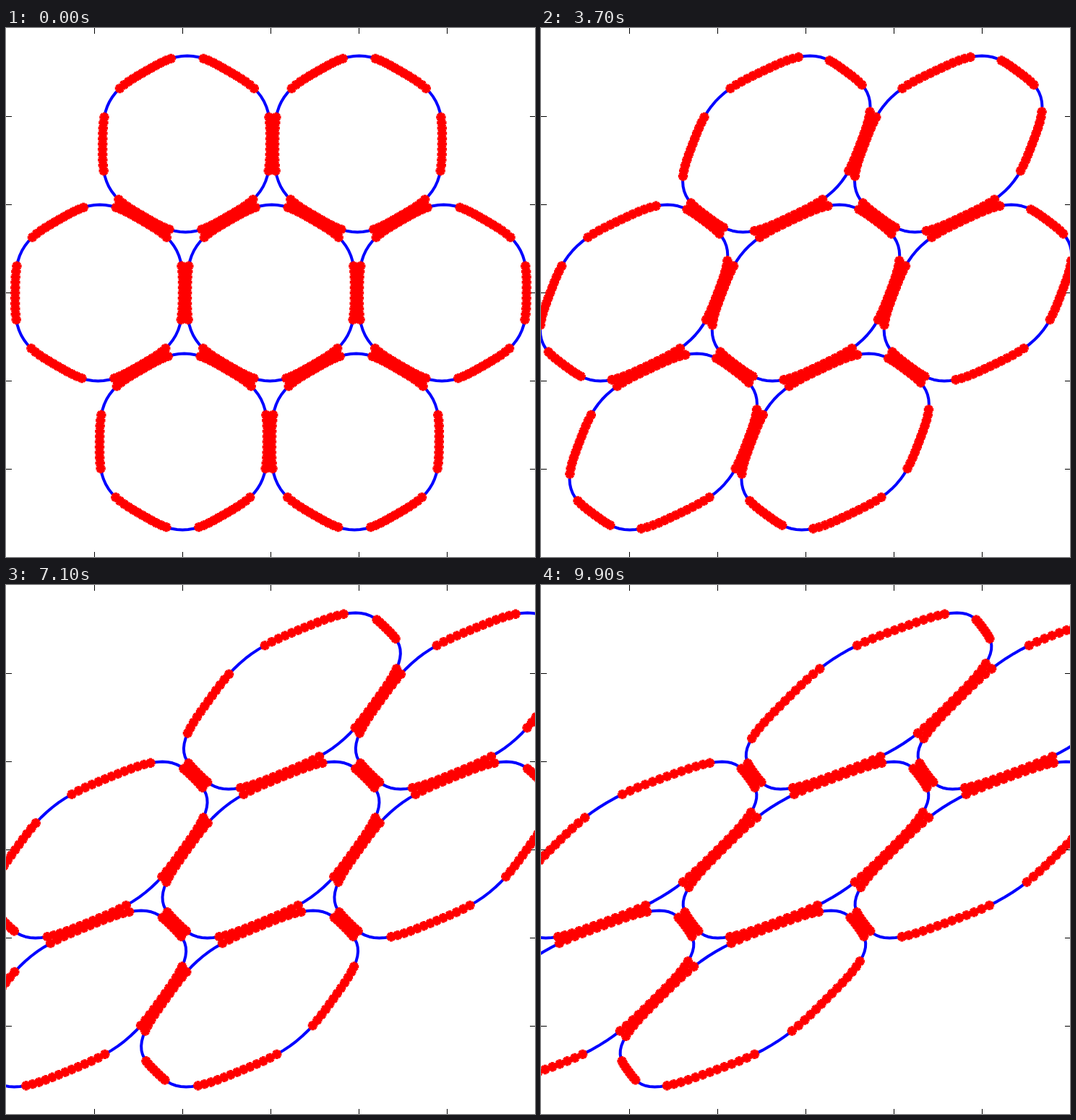
An HTML page with a canvas that plays this animation: 732x732 px, repeating every 10000 ms.

```html
<!DOCTYPE html>
<html lang="en">
<head>
<meta charset="utf-8">
<title>Sheared cell lattice</title>
<style>
  html, body { margin: 0; width: 100%; height: 100%; overflow: hidden; background: #fff; }
  canvas { display: block; }
</style>
</head>
<body>
<canvas id="stage" width="732" height="732"></canvas>
<script>
const ctx = document.getElementById('stage').getContext('2d');
const SIZE = 732, UNIT = 122, MID = 366.5;
const STEPS = 100, STEP_MS = 100;
const POINTS = 100, PITCH = 1.95, REACH = 0.1;

// Rounded hexagon, sampled evenly by angle
const outline = Array.from({ length: POINTS }, (_, k) => {
  const a = 2 * Math.PI * k / POINTS;
  const r = 0.975 - 0.025 * Math.cos(6 * a);
  return [r * Math.cos(a), r * Math.sin(a)];
});

const neighbours = Array.from({ length: 6 }, (_, k) => {
  const a = Math.PI * k / 3;
  return [PITCH * Math.cos(a), PITCH * Math.sin(a)];
});
const centres = [[0, 0], ...neighbours];

const shear = ([x, y], s) => [x + s * y, y];
const toPixel = (p, c) => [MID + UNIT * (p[0] + c[0]), MID - UNIT * (p[1] + c[1])];

// A point is in contact when any sample of a neighbouring cell is within reach
function findContacts(cell, around) {
  return cell.filter(p => around.some(c => cell.some(q =>
    Math.hypot(q[0] + c[0] - p[0], q[1] + c[1] - p[1]) < REACH)));
}

function addStar(x, y) {
  const arm = 4.7, diag = arm * 0.7;
  for (const [dx, dy] of [[arm, 0], [0, arm], [diag, diag], [diag, -diag]]) {
    ctx.moveTo(x - dx, y - dy);
    ctx.lineTo(x + dx, y + dy);
  }
}

function drawTicks() {
  ctx.fillStyle = '#000';
  for (let p = UNIT; p < SIZE; p += UNIT) {
    ctx.fillRect(p, 0, 1, 8);
    ctx.fillRect(p, SIZE - 7, 1, 7);
    ctx.fillRect(0, p, 8, 1);
    ctx.fillRect(SIZE - 7, p, 7, 1);
  }
}

function draw(step) {
  const s = (step + 1) / STEPS;
  const cell = outline.map(p => shear(p, s));
  const contacts = findContacts(cell, neighbours.map(c => shear(c, s)));
  const places = centres.map(c => shear(c, s));

  ctx.fillStyle = '#fff';
  ctx.fillRect(0, 0, SIZE, SIZE);
  drawTicks();

  ctx.lineWidth = 4;
  ctx.lineJoin = 'round';
  ctx.lineCap = 'butt';
  ctx.strokeStyle = '#00f';
  for (const c of places) {
    ctx.beginPath();
    cell.forEach(p => ctx.lineTo(...toPixel(p, c)));
    ctx.closePath();
    ctx.stroke();
  }

  ctx.lineCap = 'square';
  ctx.strokeStyle = '#f00';
  ctx.beginPath();
  for (const c of places) {
    for (const p of contacts) addStar(...toPixel(p, c));
  }
  ctx.stroke();
}

let shown = -1;
const start = performance.now();

function tick() {
  const elapsed = performance.now() - start;
  const step = Math.floor(elapsed / STEP_MS) % STEPS;
  if (step !== shown) {
    draw(step);
    shown = step;
  }
  requestAnimationFrame(tick);
}
tick();
</script>
</body>
</html>
```
